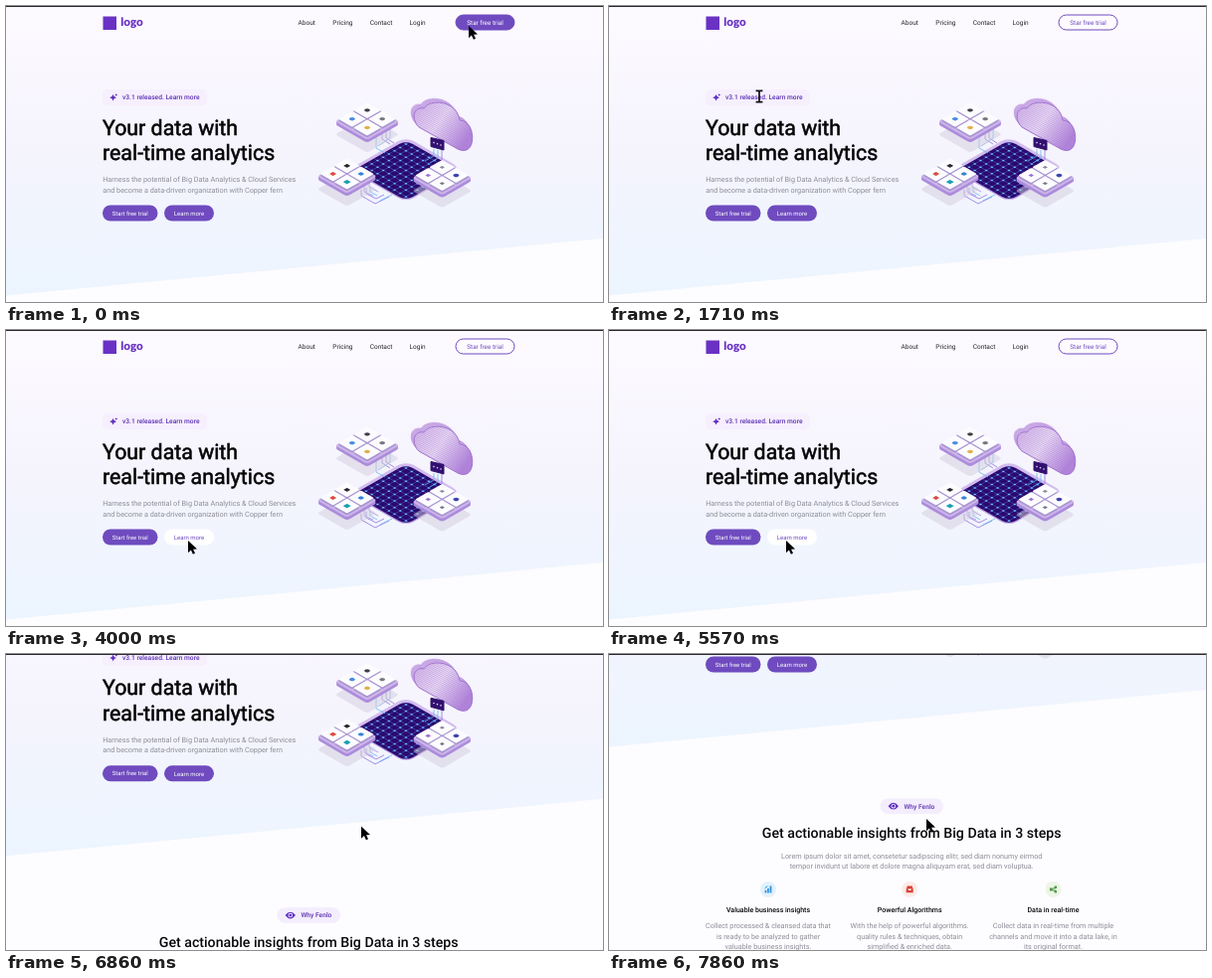
Recreate the animation shown at these times as an HTML page. Size 600x298 px, loop 8 s.

```html
<!DOCTYPE html>
<html lang="en">
<head>
<meta charset="utf-8">
<title>Landing page tour</title>
<style>
  html, body { margin: 0; width: 100%; height: 100%; overflow: hidden; background: #fdfcfe; }
  svg { display: block; width: 100%; height: 100%; }
  text { font-family: Roboto, "Open Sans", sans-serif; text-rendering: geometricPrecision; }
  .mid { text-anchor: middle; }
  .head { font-weight: 500; fill: #08080a; }
  .hero { font-size: 21.35px; fill: #050506; stroke: #050506; stroke-width: .55px; }
  .body { font-size: 7.28px; fill: #8d8d98; }
  .nav { font-size: 6.53px; fill: #26262c; }
  .tag { font-size: 6.68px; font-weight: 500; fill: #5c31b4; }
  .logo { font: 900 11.6px Lato, sans-serif; fill: #6a32c4; }
  .wire { fill: none; stroke-width: .8; }
</style>
</head>
<body>
<svg id="stage" viewBox="0 0 600 298">
  <defs>
    <linearGradient id="sky" x1="0" y1="0" x2="0" y2="290" gradientUnits="userSpaceOnUse">
      <stop offset="0" stop-color="#fdfaff"/>
      <stop offset=".45" stop-color="#f6f4fd"/>
      <stop offset="1" stop-color="#ecf5ff"/>
    </linearGradient>
    <linearGradient id="mist" x1="0" y1="0" x2="1" y2=".6">
      <stop offset="0" stop-color="#d3b6e9"/>
      <stop offset=".5" stop-color="#ebdff5"/>
      <stop offset="1" stop-color="#b184da"/>
    </linearGradient>
    <pattern id="lines" width="4" height="1.8" patternUnits="userSpaceOnUse" patternTransform="rotate(28)">
      <rect width="4" height=".7" fill="#a878d2" opacity=".55"/>
    </pattern>
    <path id="cloud" d="M415 122C407 114 409 101 420 103C426 93 453 95 456 115C465 115 470 126 468.5 136C467 146 460 147 454 144Z"/>
  </defs>

  <rect width="600" height="298" fill="#fdfcfe"/>
  <g id="page">
    <path d="M0 0H600V234L0 291.5Z" fill="url(#sky)"/>
    <rect x="97.5" y="10.5" width="13.5" height="13.5" fill="#6a32c4"/>
    <text class="logo" x="115.3" y="20.3">logo</text>
    <text class="nav" x="293.6" y="18.8">About</text>
    <text class="nav" x="328.3" y="18.8">Pricing</text>
    <text class="nav" x="365.7" y="18.8">Contact</text>
    <text class="nav" x="405.6" y="18.8">Login</text>

    <rect x="97" y="84" width="105" height="16" rx="5" fill="#f6effe"/>
    <path d="M107.6 89Q108.2 91.6 111 92.2Q108.2 92.8 107.6 95.4Q107 92.8 104.2 92.2Q107 91.6 107.6 89ZM110.8 88l.4 1.1 1.1.4-1.1.4-.4 1.1-.4-1.1-1.1-.4 1.1-.4Z" fill="#5f2fc0"/>
    <text class="tag" x="117" y="94">v3.1 released. Learn more</text>

    <text class="hero" x="97" y="129.6">Your data with</text>
    <text class="hero" x="97" y="155.4">real-time analytics</text>
    <text class="body" x="97.2" y="177.4">Harness the potential of Big Data Analytics &amp; Cloud Services</text>
    <text class="body" x="97.2" y="187.6">and become a data-driven organization with Copper fern</text>
    <g id="buttons"></g>
    <g id="art"></g>

    <rect x="272.5" y="343.5" width="63.5" height="15.5" rx="7.75" fill="#f4edfd"/>
    <path d="M280.6 351.2Q285.8 344.4 291 351.2Q285.8 358 280.6 351.2Z" fill="#5f2fc0"/>
    <circle cx="285.8" cy="351.2" r="2.3" fill="#f4edfd"/>
    <circle cx="285.8" cy="351.2" r="1.4" fill="#5f2fc0"/>
    <text class="tag" x="296.5" y="353.5">Why Fenlo</text>
    <text class="head mid" font-size="14.15" x="304.2" y="383.3">Get actionable insights from Big Data in 3 steps</text>
    <text class="body mid" x="304.2" y="404">Lorem ipsum dolor sit amet, consetetur sadipscing elitr, sed diam nonumy eirmod</text>
    <text class="body mid" x="304.2" y="414.4">tempor invidunt ut labore et dolore magna aliquyam erat, sed diam voluptua.</text>
    <g id="steps"></g>
  </g>

  <rect width="600" height="1" fill="#2c2a30"/>
  <g id="pointer">
    <path id="arrow" d="M0 0V12.2L2.9 9.5L4.9 13.8L7 12.8L5.1 8.7L9 8.4Z"/>
    <path id="beam" d="M-3.4 -5.6H-.8L0 -4.9L.8 -5.6H3.4M0 -5V5M-3.4 5.6H-.8L0 4.9L.8 5.6H3.4" fill="none" stroke="#111" stroke-width="1.7"/>
  </g>
</svg>

<script>
const $ = id => document.getElementById(id);

// Buttons: two looks that cross over on hover
const pill = ([x, y, w, h], label, size, [fill, ink, line = 'none']) =>
  `<rect x="${x}" y="${y}" width="${w}" height="${h}" rx="${h / 2}" fill="${fill}" stroke="${line}"/>
   <text class="mid" x="${x + w / 2}" y="${y + h / 2 + size * .36}" font-size="${size}" fill="${ink}">${label}</text>`;
const button = (id, box, label, size, rest, hover) =>
  `<g id="${id}"><g>${pill(box, label, size, rest)}</g><g>${pill(box, label, size, hover)}</g></g>`;
const PURPLE = '#6f4bbf';
const solid = [PURPLE, '#fff'], white = ['#fff', PURPLE];
$('buttons').innerHTML =
  button('top', [452, 9, 59, 15], 'Star free trial', 6.35, ['#fdfbff', PURPLE, PURPLE], [PURPLE, '#fff', PURPLE]) +
  button('start', [97, 200.5, 55.5, 16], 'Start free trial', 5.9, solid, white) +
  button('learn', [159, 200.5, 50, 16], 'Learn more', 6, solid, white);

// Isometric artwork
const ISO = '.866 .5 -.866 .5';
const iso = (x, y, s, fill, r = 2, extra = '') =>
  `<rect x="${-s}" y="${-s}" width="${2 * s}" height="${2 * s}" rx="${r}" fill="${fill}" ${extra}
    transform="matrix(${ISO} ${x} ${y})"/>`;
const slab = (x, y, s, depth, side, top, r) => {
  let out = '';
  for (let d = depth; d > 0; d--) out += iso(x, y + d, s, side, r);
  return out + iso(x, y, s, top, r);
};
const panel = (x, y, s, marks) => {
  const step = s * .47;
  const spots = [[0, -step], [-step * 1.732, 0], [step * 1.732, 0], [0, step]];
  return iso(x, y + 14, s, '#d3cdde', 3, 'opacity=".5"') +
    slab(x, y + 1, s, 3, '#ac8cdb', '#cdb5ec', 3) +
    spots.map(([dx, dy], i) => {
      const [ink, size, round] = marks[i];
      return slab(x + dx, y + dy - 1.5, s * .43, 2, '#a996cf', '#fcfcff', 1) +
        iso(x + dx, y + dy - 1.5, size, ink, round ? size : .2);
    }).join('');
};
const wire = (d, ink) => `<path class="wire" d="${d}" stroke="${ink}"/>`;

function board(x, y) {
  const n = 4, gap = 6.6;
  let grid = '', dots = '';
  for (let i = -n; i <= n; i++) {
    grid += `M${i * gap} -30V30M-30 ${i * gap}H30`;
    for (let j = -n; j <= n; j++) dots += `<circle cx="${i * gap}" cy="${j * gap}" r="1"/>`;
  }
  return slab(x, y - 2, 32, 2, '#b99ae2', '#d3bdef', 9) + iso(x, y, 30.6, '#2a0a6c', 8) +
    `<g transform="matrix(${ISO} ${x} ${y})" fill="#6cc8f6">
      <path d="${grid}" stroke="#4a4fc0" stroke-width=".6"/>${dots}</g>`;
}

const cloud = [3, 2, 1].map(d =>
  `<g transform="translate(${-d} ${-d * 1.3})"><use href="#cloud" fill="#cfb0e7" stroke="#b893de" stroke-width=".5"/></g>`
).join('') +
  `<use href="#cloud" fill="url(#mist)"/>
   <use href="#cloud" fill="url(#lines)" stroke="#9c6ccc" stroke-width=".9"/>`;

$('art').innerHTML =
  wire('M357 185V191L371 199L385 192M362 183V189L372 194L380 190', '#8f73dc') +
  wire('M366 182V187L373 191M376 196L388 190', '#62b9f2') +
  board(402, 165.5) +
  wire('M378 124V134L386 139M382 122V133L390 138', '#8f73dc') +
  wire('M386 121V133L374 141M372 130V143L381 148', '#62b9f2') +
  wire('M360 180V187L369 191M365 177V182L374 187', '#a58be6') +
  panel(363, 115.2, 18.6, [['#3d3d45', 2.2, 1], ['#4a8be0', 2.3, 1], ['#77777f', 2.2, 1], ['#e0b04a', 2.3, 1]]) +
  panel(342.7, 170.5, 17.3, [['#26262b', 2], ['#dc4b41', 2.1], ['#3583d8', 2.2, 1], ['#1b9fb4', 2.3]]) +
  cloud +
  wire('M430 144V151L421 156M434 145V153L426 158', '#62b9f2') +
  wire('M438 145V155', '#8f73dc') +
  `<path d="M427 132.5L440 135.5V145L427 141.5Z" fill="#32106f" stroke="#32106f" stroke-linejoin="round"/>
   <g fill="#e7d9fb"><circle cx="430" cy="137.6" r=".8"/><circle cx="433.5" cy="138.8" r=".8"/><circle cx="437" cy="140" r=".8"/></g>` +
  panel(438.3, 172, 17.3, [['#8b8b98', 1.5], ['#9a6fd4', 1.7], ['#3b43ad', 2.3, 1], ['#777783', 1.5]]);

// Three columns
const steps = [
  [160, '#e1f1fd', '<path d="M-3.4 3.5V.8h1.7v2.7ZM-.9 3.5V-1h1.7v4.5ZM1.6 3.5V-3.4h1.8v6.9Z" fill="#2b92e0"/><path d="M-3.4 -1.2L-.6 -3.2" stroke="#2b92e0"/>',
    'Valuable business insights',
    ['Collect processed &amp; cleansed data that', 'is ready to be analyzed to gather', 'valuable business insights.']],
  [302.2, '#fdebe8', '<path d="M-2.4 -3.4h4.8L3.5 0V3.3h-7V0Z" fill="#dc4238"/><path d="M-2 -.4h4L1 1.1h-2Z" fill="#fff"/>',
    'Powerful Algorithms',
    ['With the help of powerful algorithms.', 'quality rules &amp; techniques, obtain', 'simplified &amp; enriched data.']],
  [446.5, '#edf5e6', '<path d="M-2.5 0L2.5 -2.3M-2.5 0H2.5M-2.5 0L2.5 2.3" stroke="#4f9a4a" stroke-width=".8"/><path d="M-3.6 -1.5h2.6v3h-2.6ZM1.2 -3.4h2.3v2.3H1.2ZM1.2 1.1h2.3v2.3H1.2Z" fill="#4f9a4a"/>',
    'Data in real-time',
    ['Collect data in real-time from multiple', 'channels and move it into a data lake, in', 'its original format.']]
];
$('steps').innerHTML = steps.map(([x, tint, icon, title, rows]) =>
  `<g transform="translate(${x} 435)"><circle r="8" fill="${tint}"/>${icon}</g>
   <text class="head mid" font-size="7.05" x="${x}" y="458.4">${title}</text>` +
  rows.map((row, i) => `<text class="body mid" x="${x}" y="${474.2 + i * 10.5}">${row}</text>`).join('')
).join('');

// Motion
const LOOP = 8000, TICK = LOOP / 56;
const path = [
  [0, 465, 20], [143, 461, 24], [610, 300, 165], [1143, 114, 98], [1290, 110, 92],
  [1714, 151, 91], [2000, 172, 72], [2290, 186, 86], [2430, 190, 92], [3143, 191, 190],
  [3430, 190, 203], [4000, 183, 212], [4570, 128, 207], [5143, 128, 207],
  [5571, 178, 212], [6290, 357, 173], [7429, 357, 174], [7857, 319, 166]
];
const scroll = [
  [6290, 0], [6429, 3], [6571, 14.5], [6714, 48], [6857, 88], [7000, 122],
  [7143, 148], [7286, 165], [7429, 177], [7571, 186], [7714, 193], [7857, 198]
];
const hovers = {
  top: [[0, 1], [150, 1], [300, 0]],
  learn: [[3160, 0], [3300, 1], [4180, 1], [4320, 0], [5300, 0], [5430, 1], [5640, 1], [5780, 0]],
  start: [[4320, 0], [4450, 1], [5300, 1], [5430, 0]]
};
const linear = p => p, ease = p => p * p * (3 - 2 * p);
function at(keys, t, curve = linear) {
  const i = keys.findIndex(k => k[0] > t);
  if (i === 0) return keys[0].slice(1);
  if (i < 0) return keys[keys.length - 1].slice(1);
  const a = keys[i - 1], b = keys[i], p = curve((t - a[0]) / (b[0] - a[0]));
  return a.slice(1).map((v, n) => v + (b[n + 1] - v) * p);
}

function draw(now) {
  const t = Math.floor(((now % LOOP) + 5) / TICK) % 56 * TICK + .5;
  const [x, y] = at(path, t, ease), text = t > 1070 && t < 2260;
  $('page').setAttribute('transform', `translate(0 ${-at(scroll, t)[0]})`);
  $('pointer').setAttribute('transform', `translate(${x} ${y})`);
  $('arrow').style.display = text ? 'none' : '';
  $('beam').style.display = text ? '' : 'none';
  for (const id in hovers) {
    const [rest, hover] = $(id).children, on = at(hovers[id], t)[0];
    rest.setAttribute('opacity', 1 - on);
    hover.setAttribute('opacity', on);
  }
}
const began = performance.now();
function loop() {
  draw(performance.now() - began);
  requestAnimationFrame(loop);
}
loop();
</script>
</body>
</html>
```
